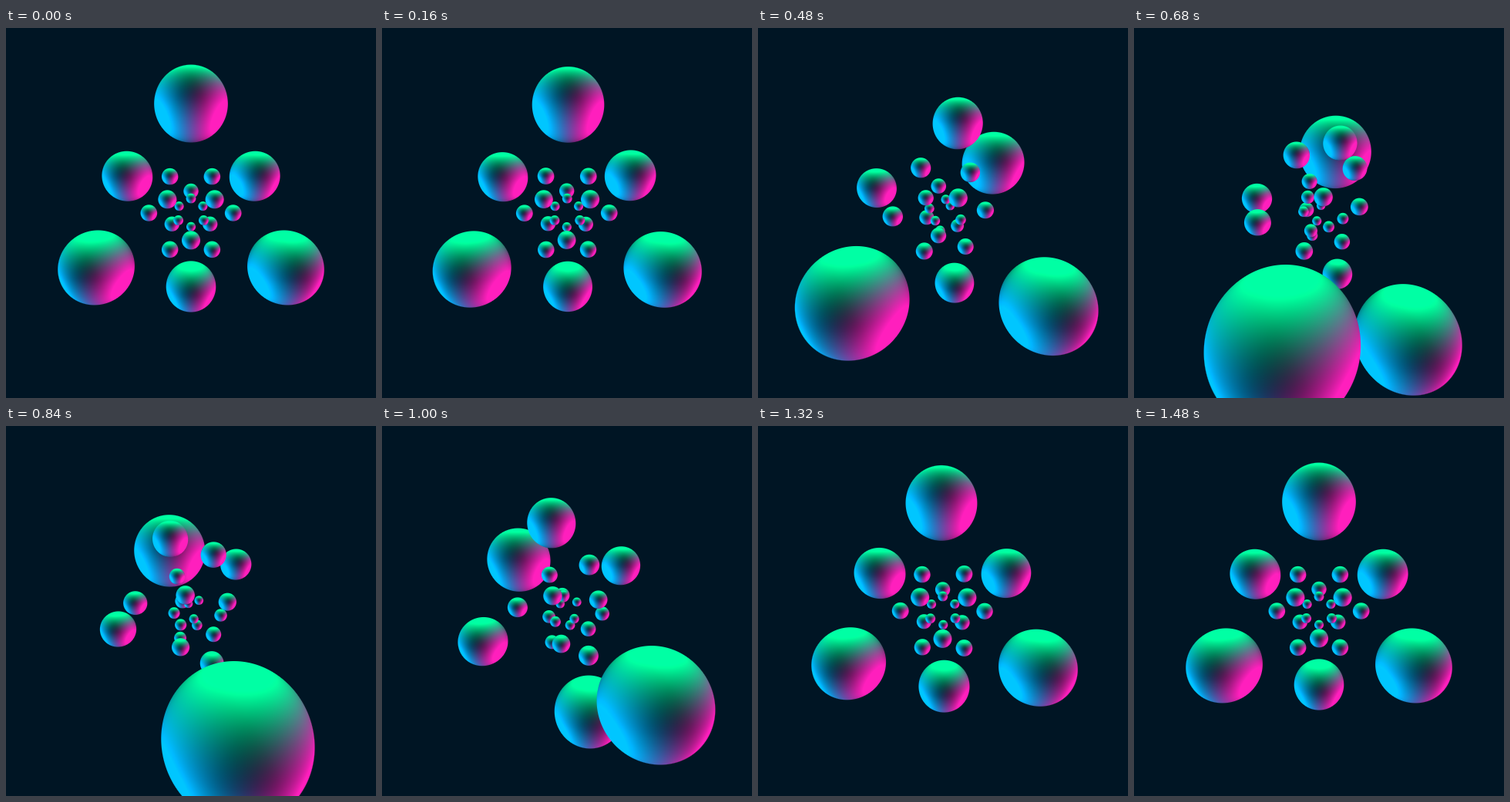
Recreate the animation shown at these times as an HTML page with a canvas. Size 480 by 480 pixels, loop 1500 ms.

```html
<!DOCTYPE html>
<html lang="en">
<head>
<meta charset="utf-8">
<title>Spheres on a 24-cell</title>
<style>
  html, body { margin: 0; height: 100%; overflow: hidden; background: #001524; }
  canvas { display: block; width: 100vw; height: 100vh; }
</style>
</head>
<body>
<canvas id="stage" width="480" height="480"></canvas>
<script>
const SIZE = 480, HALF = SIZE / 2, LOOP = 1500;
const FOCAL = 416;    // camera focal length in px
const NEAR = 1.02;    // inverse distance of the 4D eye
const SCALE = 0.1313; // inverse distance of the 3D camera
const RADIUS = 10.7 / FOCAL;
const BACK = [0, 21, 36], DARK = [0, 13, 24];
const GAIN = 1.25;

const ctx = document.getElementById('stage').getContext('2d');
const image = ctx.createImageData(SIZE, SIZE);
const px = image.data;

// A closed walk along the edges of a 24-cell. The number is the direction
// around the view axis in steps of 30 degrees, the letter the step in the zw plane.
const walk = '4 3a 2 1f 5f 6 7a 11a 9f 10 11e 9d 8 9b 7c 11c 0 1b 5b 3c 1d 5d 7e 3e'
  .split(' ').map(vertex);

function vertex(code) {
  const a = parseInt(code) * Math.PI / 6;
  const step = 'abcdef'.indexOf(code.slice(-1));
  if (step < 0) return [Math.cos(a), -Math.sin(a), 0, 0];
  const b = (step + 0.5) * Math.PI / 3;
  const side = Math.sqrt(1 / 3), deep = Math.sqrt(2 / 3);
  return [side * Math.cos(a), -side * Math.sin(a), deep * Math.sin(b), deep * Math.cos(b)];
}

function light(degrees, z, color) {
  const a = degrees * Math.PI / 180, s = Math.sqrt(1 - z * z);
  return { x: s * Math.cos(a), y: -s * Math.sin(a), z: -z, color };
}
const lights = [
  light(90, 0.23, [0, 255, 140]),
  light(207, 0.27, [0, 185, 255]),
  light(-29, 0.29, [255, 18, 165])
];

const ease = p => p * p * p * (p * (p * 6 - 15) + 10);

// Adjacent vertices are 60 degrees apart on the 3-sphere.
function slerp(a, b, p) {
  const arc = Math.PI / 3;
  const s = Math.sin(arc * (1 - p)) / Math.sin(arc);
  const t = Math.sin(arc * p) / Math.sin(arc);
  return a.map((v, i) => v * s + b[i] * t);
}

function project([x, y, z, w]) {
  const g = 1 - NEAR * w;
  const q = g - SCALE * z;
  const cx = SCALE * x / q, cy = SCALE * y / q, u = RADIUS / q;
  const dist = cx * cx + cy * cy + 1;
  return { cx, cy, u, dist, order: (dist - u * u) * (q / g) ** 2 };
}

function drawSphere({ cx, cy, u, dist }) {
  const k = 1 / (1 - u * u), r = FOCAL * u;
  const mx = HALF + FOCAL * cx * k, my = HALF + FOCAL * cy * k;
  const reach = r * k * Math.sqrt(dist) + 2;
  const clip = v => Math.max(0, Math.min(SIZE, v));
  const x0 = clip(Math.floor(mx - reach)), x1 = clip(Math.ceil(mx + reach));
  const y0 = clip(Math.floor(my - reach)), y1 = clip(Math.ceil(my + reach));

  for (let y = y0; y < y1; y++) {
    const vy = (y + 0.5 - HALF) / FOCAL;
    for (let x = x0; x < x1; x++) {
      const vx = (x + 0.5 - HALF) / FOCAL;
      const vv = vx * vx + vy * vy + 1;
      const b = vx * cx + vy * cy + 1;
      const disc = b * b - vv * (dist - u * u);
      const rho = Math.sqrt(Math.max(0, 1 - disc / (vv * u * u)));
      const alpha = Math.min(1, (1 - rho) * r + 0.5);
      if (alpha <= 0) continue;

      const t = (b - Math.sqrt(Math.max(0, disc))) / vv;
      const nx = (vx * t - cx) / u, ny = (vy * t - cy) / u, nz = (t - 1) / u;
      let [red, green, blue] = DARK;
      for (const l of lights) {
        const d = Math.max(0, nx * l.x + ny * l.y + nz * l.z);
        const power = Math.min(1, GAIN * d * d);
        red += power * l.color[0];
        green += power * l.color[1];
        blue += power * l.color[2];
      }
      const i = (y * SIZE + x) * 4;
      px[i] += (Math.min(255, red) - px[i]) * alpha;
      px[i + 1] += (Math.min(255, green) - px[i + 1]) * alpha;
      px[i + 2] += (Math.min(255, blue) - px[i + 2]) * alpha;
    }
  }
}

function clear() {
  for (let i = 0; i < px.length; i += 4) {
    px[i] = BACK[0];
    px[i + 1] = BACK[1];
    px[i + 2] = BACK[2];
    px[i + 3] = 255;
  }
}

function frame() {
  const p = ease(performance.now() % LOOP / LOOP);
  clear();
  walk.map((v, i) => project(slerp(v, walk[(i + 1) % walk.length], p)))
    .sort((a, b) => b.order - a.order)
    .forEach(drawSphere);
  ctx.putImageData(image, 0, 0);
  requestAnimationFrame(frame);
}
frame();
</script>
</body>
</html>
```
